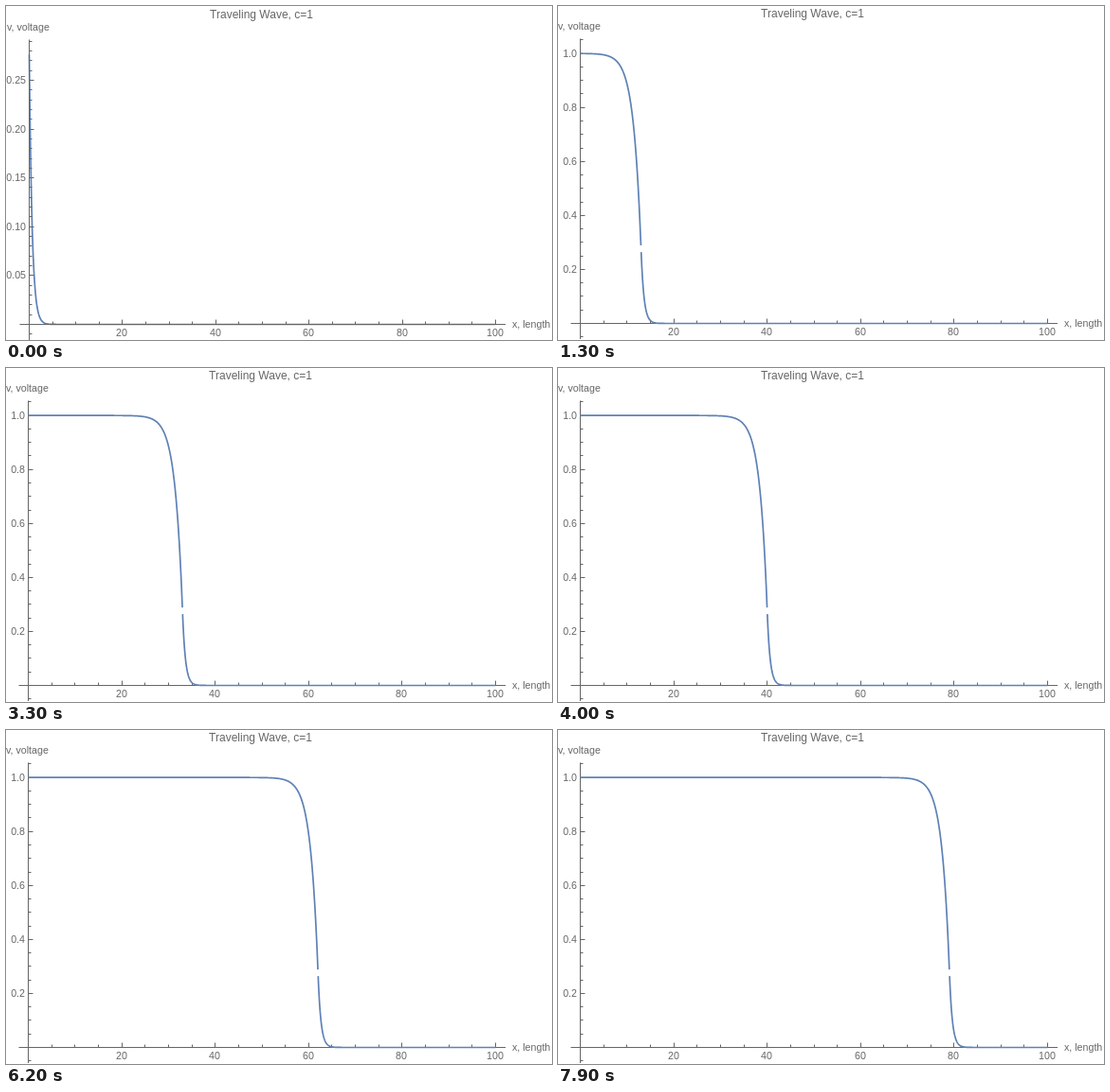
Animation of 576x353 px, one loop 8000 ms. Source, as an HTML page with a canvas:

```html
<!DOCTYPE html>
<html lang="en">
<head>
<meta charset="utf-8">
<title>Traveling Wave</title>
<style>
html, body { margin: 0; width: 576px; height: 353px; overflow: hidden; background: #fff; }
canvas { display: block; }
</style>
</head>
<body>
<canvas id="plot" width="576" height="353"></canvas>
<script>
const g = document.getElementById('plot').getContext('2d');
const GRAY = '#666', BLUE = '#5e81b5', FONT = '"Liberation Sans", Arial, sans-serif';
const ROOT5 = Math.sqrt(5), RISE = (ROOT5 - 1) / 2, FALL = (ROOT5 + 1) / 2;
const GAP = 0.028;   // half width of the break at the wave front

// Voltage at distance z from the front
const wave = z => z < 0 ? 1 - FALL / ROOT5 * Math.exp(RISE * z)
                        : RISE / ROOT5 * Math.exp(-FALL * z);
const snap = v => Math.floor(v) + 0.5;

function line(x1, y1, x2, y2) {
  g.beginPath();
  g.moveTo(x1, y1);
  g.lineTo(x2, y2);
  g.stroke();
}

function text(str, x, y, align = 'left', size = 10.67) {
  g.font = `${size}px ${FONT}`;
  g.textAlign = align;
  g.fillText(str, x, y);
}

function draw(front) {
  const shift = front ? 0 : 1;
  const left = 23.5 + shift, base = 335.5 + shift;
  const max = wave(-front);
  const px = x => left + x * (516.5 - left) / 100;
  const py = v => base - v / max * 285.3;

  function axes() {
    g.strokeStyle = g.fillStyle = GRAY;
    g.lineWidth = 1;
    line(left - 10, base, 527, base);
    line(left, 34.5 + shift, left, 352 + shift);

    for (let i = 0; i <= 20; i++) {
      const x = snap(px(i * 5)), major = i % 4 === 0;
      line(x, base, x, base - (major ? 5 : 3));
      if (major && i) text(i * 5, x - 0.5, 348 + shift, 'center');
    }

    const step = max < 0.4 ? 0.05 : max < 0.7 ? 0.1 : 0.2;
    const parts = step === 0.2 ? 4 : 5;
    const minor = step / parts;
    const first = Math.ceil(-0.055 * max / minor);
    const last = Math.floor(1.055 * max / minor);
    for (let i = first; i <= last; i++) {
      const y = snap(py(i * minor)), major = i % parts === 0;
      line(left, y, left + (major ? 5 : 3), y);
      if (major && i) {
        text((i * minor).toFixed(step < 0.1 ? 2 : 1), left - 3.5, y + 3, 'right');
      }
    }
    text('Traveling Wave, c=1', 268.5 + shift, 12 + shift, 'center', 12);
    text('v, voltage', shift, 25 + shift);
    text('x, length', 534, 339 + shift);
  }

  function curve(from, to) {
    g.beginPath();
    for (let i = 0; i <= 600; i++) {
      const x = from + (to - from) * i / 600;
      g.lineTo(px(x), py(wave(x - front)));
    }
    g.strokeStyle = BLUE;
    g.lineWidth = 1.7;
    g.lineJoin = 'round';
    g.stroke();
  }

  g.fillStyle = '#fff';
  g.fillRect(0, 0, 576, 353);
  if (front) {
    axes();
    curve(0, front - GAP);
    curve(front + GAP, 100);
  } else {
    curve(0, 100);
    axes();
  }
}

const start = performance.now();
function tick() {
  const t = (performance.now() - start) % 8000;
  draw(Math.floor(t / 100));
  requestAnimationFrame(tick);
}
tick();
</script>
</body>
</html>
```
